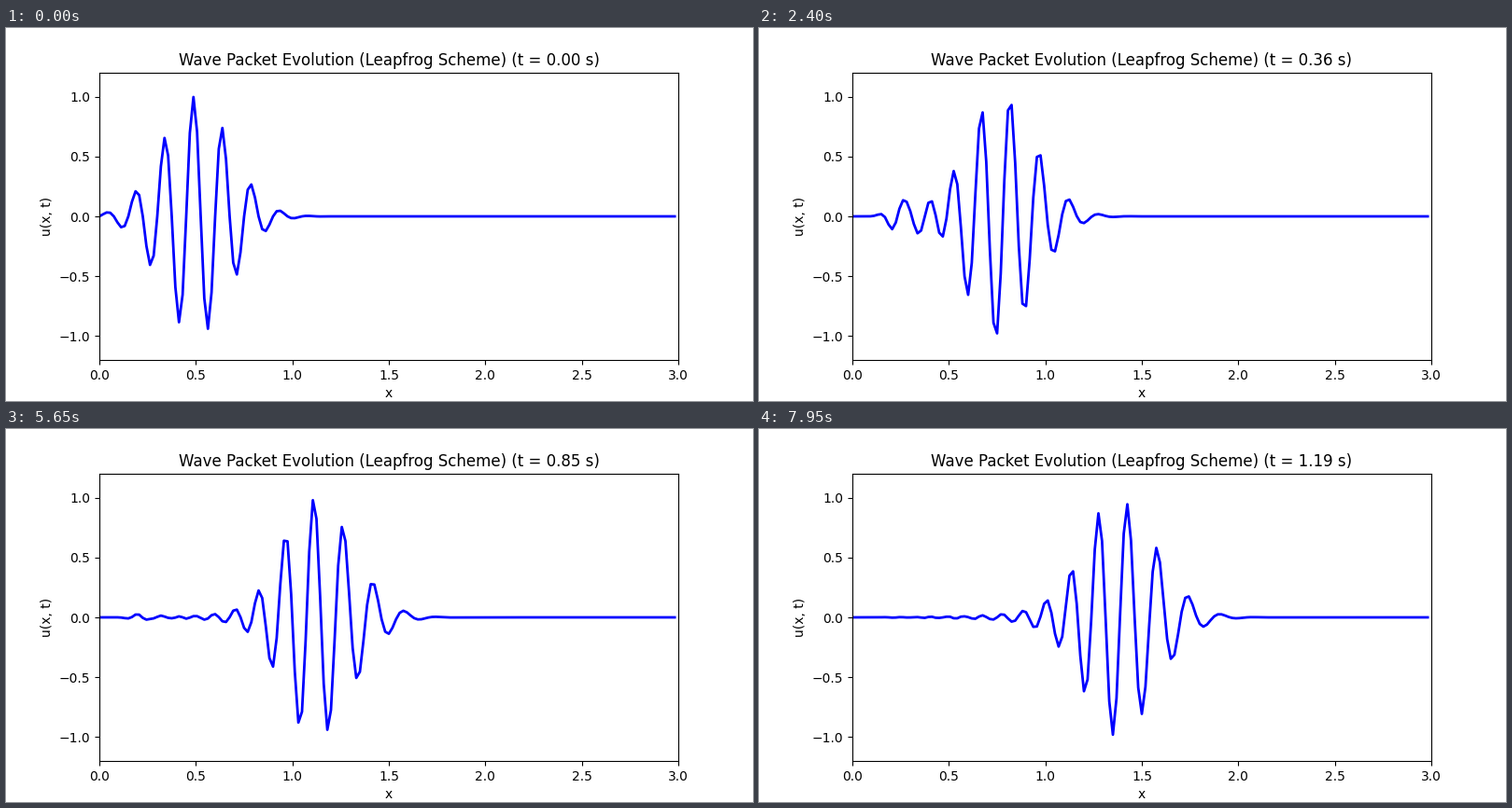
A matplotlib script that plays this animation: 800x400 px, repeating every 8000 ms.

```python
import numpy as np
import matplotlib.pyplot as plt
from matplotlib.animation import FuncAnimation

LENGTH = 3.0
CELLS = 160
COURANT = 0.4
FRAMES = 160
SPONGE = 16  # cells of damping next to the left edge

dx = LENGTH / CELLS
dt = COURANT * dx
x = np.arange(CELLS) * dx


def wave_packet(x):
    return np.exp(-16 * (x - 0.5) ** 2) * np.sin(2 * np.pi * x / (8 * dx))


def damping():
    depth = np.clip(1 - np.arange(CELLS) / SPONGE, 0, 1)
    return 1 - depth ** 2


def leapfrog(steps):
    """Solve u_t + u_x = 0, starting with two equal time levels."""
    prev = wave_packet(x)
    now = prev.copy()
    damp = damping()
    history = [now]
    for _ in range(steps - 1):
        new = np.zeros(CELLS)
        new[1:-1] = prev[1:-1] - COURANT * (now[2:] - now[:-2])
        prev, now = now, new * damp
        history.append(now)
    return history


states = leapfrog(FRAMES)

fig, ax = plt.subplots(figsize=(8, 4), dpi=100)
line, = ax.plot(x, states[0], color="blue", lw=2)
ax.set_xlim(0, LENGTH)
ax.set_ylim(-1.2, 1.2)
ax.set_xlabel("x")
ax.set_ylabel("u(x, t)")
title = ax.set_title("")


def update(frame):
    line.set_ydata(states[frame])
    title.set_text(
        f"Wave Packet Evolution (Leapfrog Scheme) (t = {frame * dt:.2f} s)")
    return line, title


anim = FuncAnimation(fig, update, frames=FRAMES, interval=50,
                     repeat=True, repeat_delay=0, blit=False)
plt.show()
```
